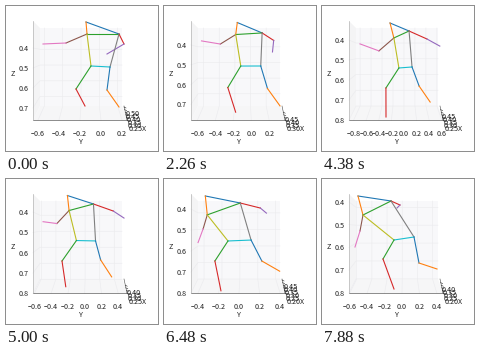
A matplotlib script for the animation above (8000 ms loop, 152 by 145 pixels).

```python
import numpy as np
import matplotlib.pyplot as plt
from matplotlib.animation import FuncAnimation

W, H, DPI = 152, 145, 100
PX = 72 / DPI
LOOP, STEP = 8000, 20
plt.rcParams["font.family"] = ["Noto Sans CJK JP", "DejaVu Sans"]

# Moving stretches: start ms, end ms, number of poses; held in between.
SPANS = [(20, 240, 12), (420, 1220, 26), (1240, 2040, 24), (2060, 2860, 27),
         (2880, 3680, 29), (3720, 4480, 32), (4580, 4720, 8), (4860, 5000, 6),
         (5180, 5260, 5), (5420, 6040, 26), (6220, 7020, 31), (7040, 7120, 4),
         (7260, 7880, 25)]
KEY_TIMES = [0, 1200, 3200, 4380, 5700, 6480, 7880]

# Joint paths on the stage, one point per key time.
TORSO = {
    "head": [(80, 16), (78, 16), (69, 17), (68, 17), (54, 16), (41, 17), (36, 17)],
    "l_shoulder": [(81, 28), (78, 28), (66, 29), (72, 32), (53, 31), (43, 36), (41, 36)],
    "r_shoulder": [(113, 28), (107, 28), (90, 26), (87, 25), (88, 25), (76, 24), (69, 22)],
    "l_hip": [(85, 60), (82, 59), (72, 61), (77, 62), (63, 61), (64, 62), (72, 61)],
    "r_hip": [(104, 61), (103, 60), (91, 60), (90, 61), (89, 63), (87, 61), (92, 58)],
}
ARMS = {
    "l_elbow": [(60, 37), (60, 37), (53, 39), (57, 45), (44, 44), (39, 50), (38, 52)],
    "l_wrist": [(37, 38), (37, 37), (38, 33), (38, 38), (36, 48), (34, 64), (33, 68)],
    "r_elbow": [(118, 38), (117, 36), (103, 33), (105, 33), (110, 31), (96, 29), (78, 26)],
    "r_wrist": [(101, 48), (109, 47), (108, 45), (118, 40), (118, 38), (102, 34), (75, 29)],
}
LEGS = {
    "l_knee": [(70, 83), (68, 81), (60, 82), (64, 82), (47, 82), (51, 82), (61, 80)],
    "l_ankle": [(79, 100), (80, 102), (64, 110), (64, 111), (55, 104), (57, 112), (72, 110)],
    "r_knee": [(101, 84), (104, 82), (103, 83), (97, 80), (92, 82), (98, 82), (97, 84)],
    "r_ankle": [(113, 101), (116, 102), (116, 98), (108, 96), (103, 100), (116, 92), (115, 90)],
}
JOINTS = {**TORSO, **ARMS, **LEGS}

BONES = [("head", "r_shoulder"), ("head", "l_shoulder"), ("l_shoulder", "r_shoulder"),
         ("r_shoulder", "r_elbow"), ("r_elbow", "r_wrist"),
         ("l_shoulder", "l_elbow"), ("l_elbow", "l_wrist"),
         ("r_shoulder", "r_hip"), ("l_shoulder", "l_hip"), ("l_hip", "r_hip"),
         ("r_hip", "r_knee"), ("r_knee", "r_ankle"),
         ("l_hip", "l_knee"), ("l_knee", "l_ankle")]

# Axis scales: pixel of a reference value and pixels per tick.
Y_SCALE = [(95, 21), (94, 19.8), (81, 16.2), (82, 12.5), (75, 21.5), (75, 20.5), (80, 17.4)]
Z_SCALE = [(42, 20), (41, 19.7), (37, 20), (34, 20), (32, 20.7), (30, 21), (23, 22.7)]
X_RANGE = [(.25, .50), (.25, .50), (.30, .45), (.25, .45), (.20, .35), (.20, .45), (.20, .40)]

LEFT, TOP, RIGHT, BOTTOM = 27, 15, 121, 114
B_LEFT, B_TOP, B_RIGHT, B_BOTTOM = 34, 22, 116, 100

fig = plt.figure(figsize=(W / DPI, H / DPI), dpi=DPI, facecolor="white")
ax = fig.add_axes([0, 0, 1, 1])
ax.set(xlim=(0, W), ylim=(H, 0))
ax.axis("off")


def line(color, width, z):
    return ax.plot([], [], color=color, lw=width * PX, zorder=z,
                   solid_capstyle="projecting")[0]


def label(x=0, y=0, text="", ha="center"):
    return ax.text(x, y, text, size=7.2 * PX, color="#222222", ha=ha,
                   va="center_baseline", zorder=4)


def pane(points, color):
    ax.fill(*zip(*points), color=color, lw=0, zorder=0)


pane([(B_LEFT, B_TOP), (B_RIGHT, B_TOP), (B_RIGHT, B_BOTTOM), (B_LEFT, B_BOTTOM)], "#f8f8fa")
pane([(LEFT, TOP), (B_LEFT, B_TOP), (B_LEFT, B_BOTTOM), (LEFT, BOTTOM)], "#f4f4f5")
pane([(LEFT, BOTTOM), (B_LEFT, B_BOTTOM), (B_RIGHT, B_BOTTOM), (RIGHT, BOTTOM)], "#f6f6f7")
for xs, ys, color in [((LEFT, RIGHT), (BOTTOM, BOTTOM), "#444444"),
                      ((LEFT, LEFT), (TOP, BOTTOM), "#aaaaaa"),
                      ((B_RIGHT + 2, RIGHT), (B_BOTTOM, BOTTOM), "#555555")]:
    line(color, 0.6, 2).set_data(xs, ys)
label(7, 67, "Z")
label(75, 135, "Y")
label(138, 122, "X")

bones = [line(f"C{i % 10}", 1.1, 3) for i in range(len(BONES))]
y_ticks = [(label(), line("#ebebee", 0.6, 1)) for _ in range(8)]
z_ticks = [(label(ha="right"), line("#ebebee", 0.6, 1)) for _ in range(5)]
x_ticks = [(label(), line("#333333", 0.6, 2)) for _ in range(7)]


def pose_time(t):
    """Time of the pose on show: stepped while moving, held in the gaps."""
    shown = 0
    for start, end, count in SPANS:
        if t < start:
            break
        gap = (end - start) / (count - 1)
        shown = min(end, start + gap * int((t - start) / gap + 1e-6))
    return shown


def at(keys, t):
    return [np.interp(t, KEY_TIMES, axis) for axis in zip(*keys)]


def remap(v, a, b, c, d):
    return c + (v - a) * (d - c) / (b - a)


def draw(frame):
    t = pose_time(frame * STEP)
    pose = {name: at(keys, t) for name, keys in JOINTS.items()}
    for artist, (a, b) in zip(bones, BONES):
        artist.set_data(*zip(pose[a], pose[b]))

    zero, gap = at(Y_SCALE, t)
    for i, (text, grid) in enumerate(y_ticks, -4):
        x = zero + i * gap
        show = LEFT <= x <= RIGHT
        back = remap(x, LEFT, RIGHT, B_LEFT, B_RIGHT)
        text.set(text=f"{i * 0.2:.1f}".replace("-", "\u2212"), position=(x, 127), visible=show)
        grid.set(data=([x, back, back], [BOTTOM, B_BOTTOM, B_TOP]), visible=show)

    first, gap = at(Z_SCALE, t)
    for i, (text, grid) in enumerate(z_ticks):
        y = first + i * gap
        show = y <= BOTTOM + 1.5
        back = remap(y, TOP, BOTTOM, B_TOP, B_BOTTOM)
        text.set(text=f"{0.4 + i * 0.1:.1f}", position=(22.5, y), visible=show)
        grid.set(data=([LEFT, B_LEFT, B_RIGHT], [y, back, back]), visible=show)

    low, high = (round(v * 20) for v in at(X_RANGE, t))
    for i, (text, mark) in enumerate(x_ticks):
        show = low + i <= high
        x, y = 129.5 - 0.6 * i, 122 - 3.1 * i
        text.set(text=f"{(low + i) / 20:.2f}", position=(x, y), visible=show)
        mark.set(data=([RIGHT - 0.6 * i, RIGHT + 2 - 0.6 * i],
                       [BOTTOM - 2.6 * i, BOTTOM + 1 - 2.6 * i]), visible=show)
    return []


anim = FuncAnimation(fig, draw, frames=LOOP // STEP, interval=STEP,
                     repeat=True, repeat_delay=0, blit=False)
plt.show()
```
